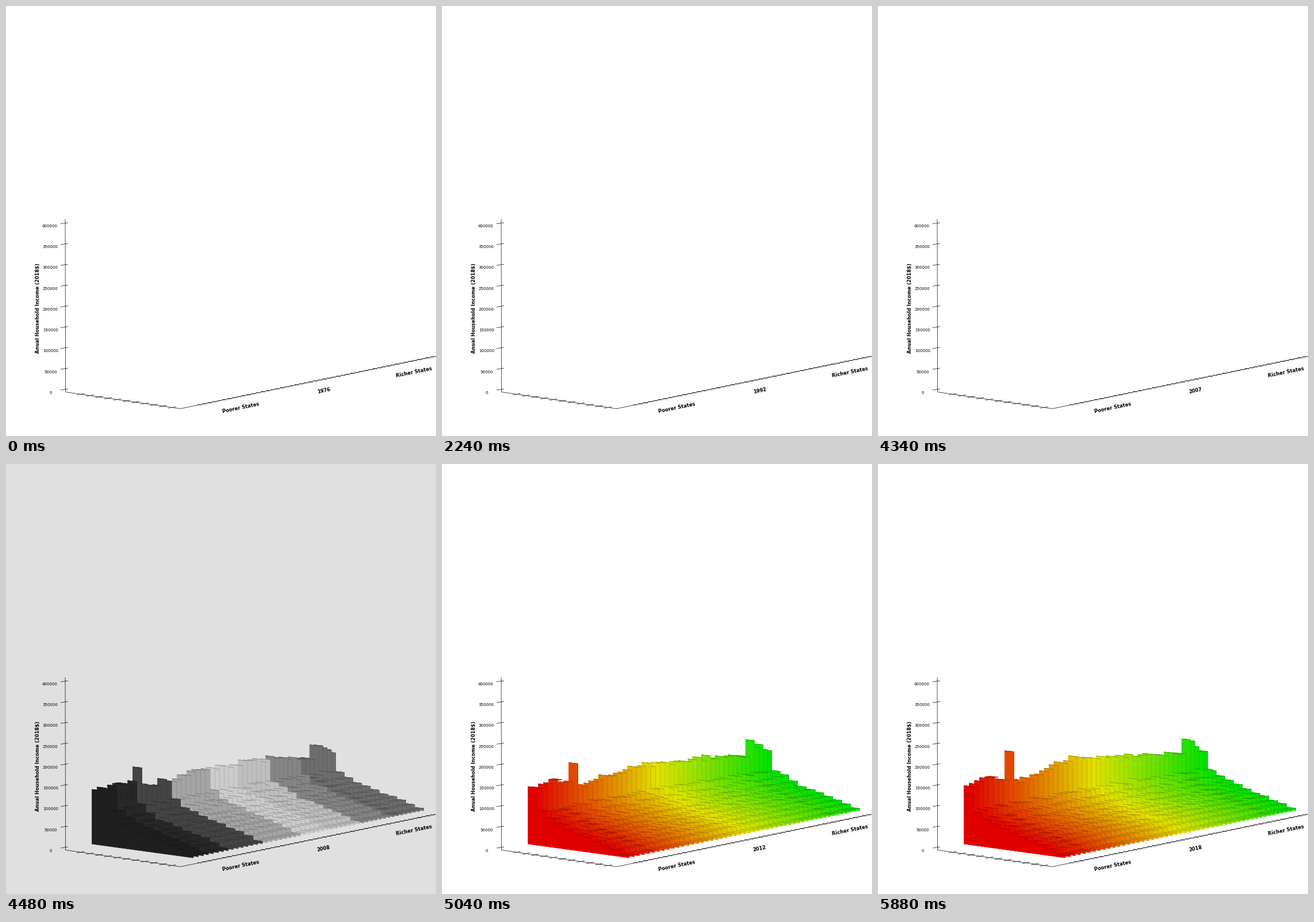
Recreate the animation shown at these times as a matplotlib script. Size 748 by 748 pixels, loop 6.02 s.

```python
import numpy as np
import matplotlib.pyplot as plt
from matplotlib.animation import FuncAnimation
from matplotlib.collections import LineCollection, PolyCollection
from matplotlib.patches import Rectangle

SIZE, DPI = 748, 50
FIRST_YEAR, DATA_YEAR, YEARS = 1976, 2008, 43
STATES, GROUPS = 51, 11

plt.rcParams["font.family"] = "DejaVu Sans"

# (state, top of its tallest bar in 2009, the same in 2018)
SKYLINE = [(0, 567, 558), (4, 556, 545), (7, 552, 552), (8, 528, 499), (9, 558, 549),
           (12, 556, 545), (16, 545, 530), (21, 530, 511), (27, 524, 510),
           (36, 510, 506), (45, 512, 503), (46, 484, 476), (50, 501, 500)]
# (first state, grey level) of the bands in the first year with data
GRAY_BANDS = [(0, 31), (4, 40), (8, 68), (15, 164), (23, 203), (29, 190), (36, 133), (43, 109)]

FRONT, TOP, SIDE = 0.883, 0.70, 0.75
DEPTH = 0.08
DEEP_STATES = (4, 43)


def project(u, v, z=0):
    """Perspective view of group u, state v and height z in pixels."""
    s, t = u / GROUPS, v / (STATES - 1)
    w = 1 - 0.024 * s + 0.102 * t
    x = (149.5 + s * (325 * 0.976 - 149.5) + t * (558 * 1.102 - 149.5)) / w
    y = (661 + s * (685 * 0.976 - 661) + t * (583 * 1.102 - 661) - z) / w
    return x, y


def bar_heights(year):
    state = np.arange(STATES)
    keys, first, last = zip(*SKYLINE)
    start, end = np.interp(state, keys, first), np.interp(state, keys, last)
    peak = start + (end - start) * max(year - 2009, 0) / 9
    rng = np.random.default_rng(year)
    peak += rng.normal(0, 2.5, STATES)
    tall = (project(0, state)[1] - peak) * (1 + 0.102 * state / (STATES - 1))

    # Lower income groups follow one smooth curve in every state
    x = np.linspace(1, -1, GROUPS - 1)
    profile = np.polyval([6.2, 4.3, 20.3, 26.2], x) * (1 + 0.006 * (year - 2009))
    spread = rng.normal(1, 0.035, (STATES, GROUPS - 1))
    spread *= 1 + 0.06 * np.sin(np.pi * state / (STATES - 1))[:, None]
    return np.column_stack([tall, profile * spread])


def state_color(state, gray):
    if gray:
        level = [g for start, g in GRAY_BANDS if start <= state][-1]
        return np.full(3, level / 255 / FRONT)
    t = 2 * state / (STATES - 1)
    return np.array([min(1, 2 - t), min(1, t), 0])


def build_bars(year):
    heights = bar_heights(year)
    polys, colors = [], []
    for state in reversed(range(STATES)):
        color = state_color(state, year == DATA_YEAR)
        back = state + DEPTH
        top_back = state + (1 if state in DEEP_STATES else DEPTH)
        for u in range(GROUPS):
            z = heights[state, u]
            a, b = project(u, state, z), project(u + 1, state, z)
            c, d = project(u + 1, state), project(u, state)
            side = [b, project(u + 1, back, z), project(u + 1, back), c]
            top = [a, b, project(u + 1, top_back, z), project(u, top_back, z)]
            polys += [side, [a, b, c, d], top]
            colors += [color * SIDE, color * FRONT, color * TOP]
    return polys, np.clip(colors, 0, 1)


def draw_axes(ax):
    lines = [[(103, 371), (103.5, 671.5)],
             [(103.5, 671.5), (303.5, 700.5)],
             [(303.5, 700.5), (748.5, 609)]]
    for i in range(9):
        y = 667 - 36.15 * i
        lines.append([(95, y + 1.1), (107.8, y - 0.9)])
        ax.text(77.8 - 0.17 * i, 672.8 - 36.25 * i, str(50000 * i),
                size=10, ha="center", va="center")
    for x in np.linspace(130, 289, 11):
        y = 671.5 + (x - 103.5) * 0.145
        lines.append([(x - 6.6, y + 1.2), (x + 6.6, y - 1.2)])
    for i in range(STATES):
        x = 337 + 8.65 * i - 0.011 * i * i
        y = 700.5 - (x - 303.5) * 0.2057
        lines.append([(x - 4, y - 0.5), (x + 3.5, y + 0.5)])
    ax.add_collection(LineCollection(lines, colors="black", linewidths=1, zorder=1))


def bold(ax, x, y, text, angle):
    return ax.text(x, y, text, size=12, weight="bold", rotation=angle,
                   ha="center", va="center", zorder=4)


fig = plt.figure(figsize=(SIZE / DPI, SIZE / DPI), dpi=DPI, facecolor="white")
ax = fig.add_axes([0, 0, 1, 1])
ax.set_xlim(0, SIZE)
ax.set_ylim(SIZE, 0)
ax.axis("off")

backdrop = ax.add_patch(Rectangle((-2, -2), SIZE + 4, SIZE + 4, fc="white", lw=0, zorder=0))
draw_axes(ax)
bold(ax, 55.3, 526, "Anual Household Income (2018$)", 90)
bold(ax, 408.5, 699, "Poorer States", 11.6)
bold(ax, 709.5, 637.2, "Richer States", 11.6)
year_label = bold(ax, 552.5, 669.3, str(FIRST_YEAR), 11.6)
bars = PolyCollection([], linewidths=1, zorder=2)
ax.add_collection(bars, autolim=False)


def update(i):
    year = FIRST_YEAR + i
    year_label.set_text(str(year))
    backdrop.set_facecolor("#e0e0e0" if year == DATA_YEAR else "white")
    bars.set_visible(year >= DATA_YEAR)
    if year >= DATA_YEAR:
        polys, colors = build_bars(year)
        bars.set_verts(polys)
        bars.set_facecolor(colors)
        bars.set_edgecolor(colors)
    return backdrop, bars, year_label


anim = FuncAnimation(fig, update, frames=YEARS, interval=140, repeat=True,
                     repeat_delay=0, blit=False)
plt.show()
```
